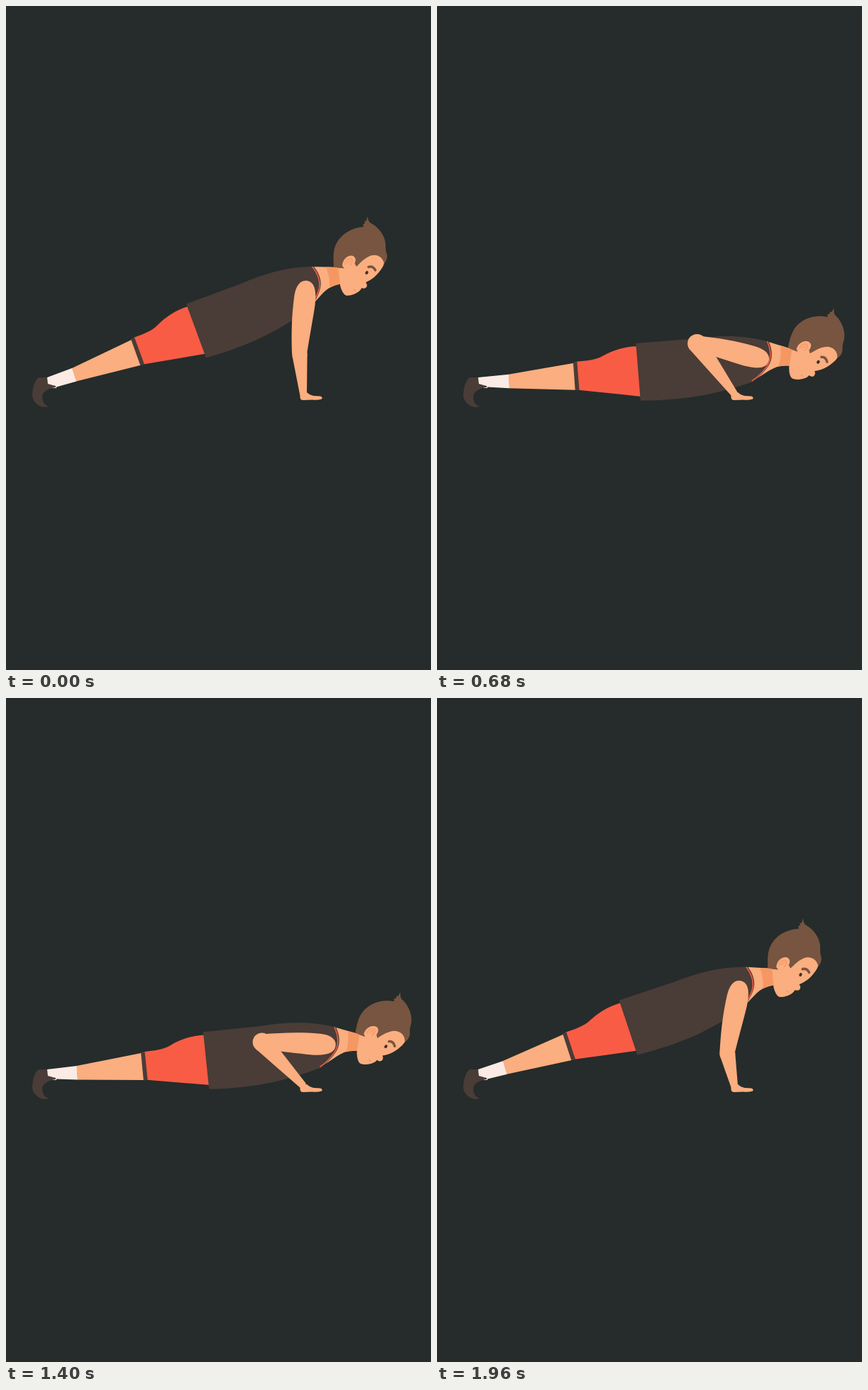
Recreate the animation shown at these times as an HTML page. Size 599x935 px, loop 2 s.

```html
<!DOCTYPE html>
<html lang="en">
<head>
<meta charset="utf-8">
<title>Push-up</title>
<style>
  html, body { margin: 0; width: 100%; height: 100%; overflow: hidden; background: #252c2b; }
  svg { display: block; width: 100%; height: 100%; }
  .skin { fill: #fbae7f; }
  .shade { fill: #f59762; }
  .cloth { fill: #4a3c37; }
  .red { fill: #f95c45; }
  .hair { fill: #775540; }
  .line { fill: none; stroke-linecap: round; stroke-linejoin: round; }
</style>
</head>
<body>
<svg viewBox="0 0 599 935">
  <path id="sock" fill="#fcebe5"/>
  <g id="body">
    <path class="skin" d="M93 510 L179 469 L191 505.500 L99 528.500 Z"/>
    <path class="red" d="M180 467 C194 462 206 457 213 450 C226 437 240 428 257 423 L282 489.500 L194 504.500 Z"/>
    <path class="cloth" d="M176 469 L181 466.500 L195 504.500 L189.500 506.500 Z"/>

    <path class="skin" d="M431 367 L470 368 L473 391 C460 394 456 395 445 406 L426 427 L418 400 Z"/>
    <path class="shade" d="M451 367.500 L470 368 L473 391 Q463 393 456 397 Q457 381 451 367.500 Z"/>
    <path class="cloth" d="M254 419.500 L330 391.500 C364 377 396 367 434 367 C443 378 446 390 442 401 C438 412 433 420 427 427 C406 442 387 453 366 464 C339 477 312 487 282 495.500 Z"/>
    <path class="line" stroke="#f95c45" stroke-width="1.500" d="M432 367.500 C441 379 444 390 440.500 401 C437 411 432 419 426 426"/>

    <path class="skin" d="M467 358 L508 345 L533 352 C535 360 532 367 527 373 C522 380 515 386 507 389 Q510 393 508 396 Q505 399 501 397 C500 401 495 404 490 406 Q484 408.500 479 407.500 Q474 405 471 394 Z"/>
    <path class="hair" d="M462 367 C461 352 461 342 467 332 C473 322 486 312 504 311 L503 307 L505.500 306.500 L505.500 302.500 L507.500 303 L509.500 296 Q510 302 513 305 C525 311 534 323 535 335 C535 341 535 345 537 350 Q538 357 533 363 C531 354 524 349 514 351.500 C505 355 500 361 494 367 L491 362 L480 369 Q470 370 462 367 Z"/>
    <path class="skin" d="M474 366 C474 356 483 350 489 352 C495 355 493 362 488 367 L479 372 Z"/>
    <path class="line" stroke="#f59762" stroke-width="1.200" d="M478 364 C478 357 485 354 488 357 Q489 361 485 365 M481 362 L485 359"/>
    <path class="line" stroke="#775540" stroke-width="3.500" d="M511 367.500 Q517 365.500 520.500 372"/>
    <ellipse cx="508.500" cy="375.500" rx="2" ry="2.600" transform="rotate(25 508.500 375.500)" fill="#3d302c"/>
    <path class="line" stroke="#ee8d5c" stroke-width="1" d="M490 399 L493 401"/>
  </g>
  <path class="cloth" d="M46 523 L58 523 L59 532 L66 534 L70 535 L70 537 L64 538 Q55 541 51.500 547 Q50 554 54 560 Q56 563 60 563.500 Q54 566.500 46 562.500 Q37 556 37 548 Q38 529 46 523 Z"/>
  <g class="skin">
    <path id="upper" d="M91 -10 C60 -11 40 -12.500 20 -13 C-2 -13 -13 -8 -13 3 C-13 12 -4 17 10 17.500 C40 18 65 15 91 11 Z"/>
    <path id="fore"/>
    <circle id="elbow"/>
    <path d="M414 544 L424 544 Q428 548 434 549 L443 549.500 Q447 551 445 553.500 Q438 555.500 432 554.500 L419 555 Q414 555 414.500 550 Z"/>
  </g>
</svg>
<script>
  const LOOP = 2000, STEP = 40, TILT = 16.8;
  const PIVOT = [66, 546], CHEST = [354, 462], SHOULDER = [425, 400], WRIST = [419, 546];
  const ARM = 91, RAD = Math.PI / 180;
  // time in ms, depth of the push-up
  const KEYS = [[0, 0], [200, .315], [480, .712], [680, .932], [840, 1], [1160, 1],
    [1200, .996], [1600, .624], [1720, .47], [1960, .107], [2000, 0]];
  const el = id => document.getElementById(id);
  const slope = (a, b) => (b[1] - a[1]) / (b[0] - a[0]);

  // harmonic mean of the neighbouring slopes: smooth, without overshoot
  const tangents = KEYS.map((k, i) => {
    if (i === 0) return slope(k, KEYS[1]);
    if (i === KEYS.length - 1) return slope(KEYS[i - 1], k);
    const a = slope(KEYS[i - 1], k), b = slope(k, KEYS[i + 1]);
    return a * b > 0 ? 2 * a * b / (a + b) : 0;
  });

  function depthAt(t) {
    let i = 0;
    while (i < KEYS.length - 2 && t >= KEYS[i + 1][0]) i++;
    const [t0, y0] = KEYS[i], [t1, y1] = KEYS[i + 1];
    const h = t1 - t0, s = (t - t0) / h, r = 1 - s;
    return r * r * (1 + 2 * s) * y0 + s * s * (3 - 2 * s) * y1
      + h * s * r * (r * tangents[i] - s * tangents[i + 1]);
  }

  function turn([x, y], deg, [cx, cy]) {
    const c = Math.cos(deg * RAD), s = Math.sin(deg * RAD);
    const dx = x - cx, dy = y - cy;
    return [cx + dx * c - dy * s, cy + dx * s + dy * c];
  }

  const CHEST_LOW = turn(CHEST, TILT, PIVOT);

  // limb tapering between two round joints
  function taper([ax, ay], ra, [bx, by], rb) {
    const dir = Math.atan2(by - ay, bx - ax);
    const spread = Math.acos((ra - rb) / Math.hypot(bx - ax, by - ay));
    const at = (x, y, r, a) => `${x + r * Math.cos(a)} ${y + r * Math.sin(a)}`;
    const p = dir + spread, q = dir - spread;
    return `M${at(ax, ay, ra, p)} L${at(bx, by, rb, p)} L${at(bx, by, rb, q)} L${at(ax, ay, ra, q)} Z`;
  }

  function draw(t) {
    const d = depthAt(t), tilt = TILT * d;
    // the chest sinks in a straight line while the body turns about it
    const mx = (CHEST_LOW[0] - CHEST[0]) * d, my = (CHEST_LOW[1] - CHEST[1]) * d;
    const place = point => {
      const [x, y] = turn(point, tilt, CHEST);
      return [x + mx, y + my];
    };
    el("body").setAttribute("transform", `translate(${mx} ${my}) rotate(${tilt} ${CHEST})`);
    el("sock").setAttribute("d",
      `M58 523 L${place([93.5, 509.8])} L${place([99.5, 528.4])} L71 536.500 L71 538 L66 538 L58 533 Z`);

    const [bx, by] = place(SHOULDER);
    const sx = bx + 5 * d ** 3, sy = by - 4 * d * d;
    const swing = 7 + 36 * d + 106 * d ** 2 - 34 * d ** 3;
    const elbow = [sx - ARM * Math.sin(swing * RAD), sy + ARM * Math.cos(swing * RAD)];
    const r = 10.7 + 2.8 * d;
    el("upper").setAttribute("transform", `translate(${sx} ${sy}) rotate(${90 + swing})`);
    el("fore").setAttribute("d", taper(elbow, r, WRIST, 5));
    el("elbow").setAttribute("cx", elbow[0]);
    el("elbow").setAttribute("cy", elbow[1]);
    el("elbow").setAttribute("r", r);
  }

  const start = performance.now();
  function tick() {
    const t = (performance.now() - start) % LOOP;
    draw(Math.floor(t / STEP) * STEP);
    requestAnimationFrame(tick);
  }
  tick();
</script>
</body>
</html>
```
